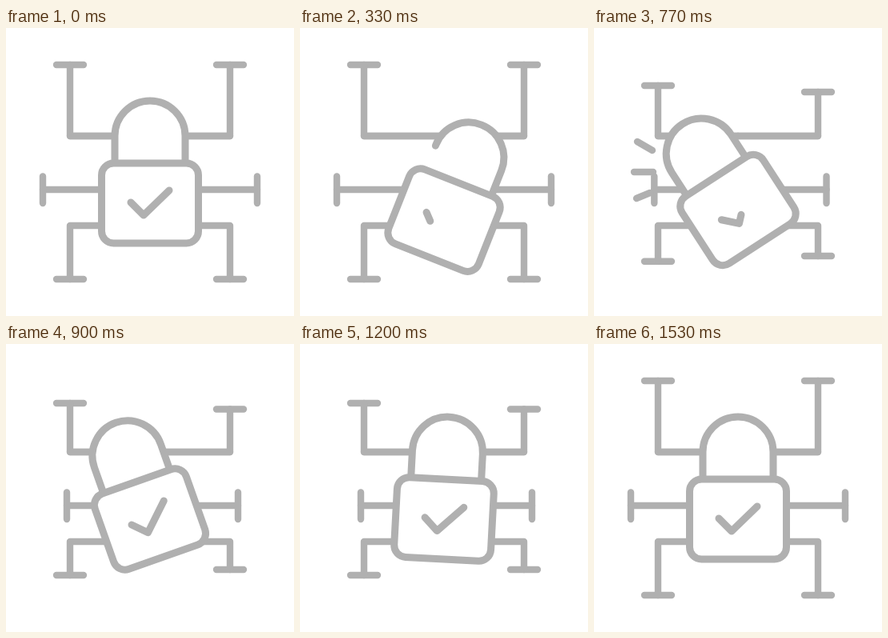
An HTML page with a canvas for the animation above (1670 ms loop, 360 by 360 pixels).

```html
<!DOCTYPE html>
<html lang="en">
<head>
<meta charset="utf-8">
<title>Lock</title>
<style>
html, body { margin: 0; height: 100%; overflow: hidden; background: #fff; }
canvas { display: block; width: 100vw; height: 100vh; }
</style>
</head>
<body>
<canvas width="360" height="360"></canvas>
<script>
const ctx = document.querySelector('canvas').getContext('2d');
const LOOP = 1670;

// Eased value from alternating time, value pairs
function key(t, ...k) {
  if (t <= k[0]) return k[1];
  for (let i = 2; i < k.length; i += 2) {
    if (t < k[i]) {
      const p = (t - k[i - 2]) / (k[i] - k[i - 2]);
      return k[i - 1] + (k[i + 1] - k[i - 1]) * (1 - Math.cos(Math.PI * p)) / 2;
    }
  }
  return k[k.length - 1];
}

const angle = t => key(t, 10, 0, 580, 36, 800, -36, 1065, 16, 1320, -7.5, 1530, 0);
const drop = t => key(t, 0, 0, 446, 25, 590, 25, 890, 0);
const opening = t => key(t, 80, 0, 420, 39, 590, 39, 740, 0);
const checked = t => key(t, 60, 1, 435, 0, 650, 0, 890, 1);

const body = new Path2D();
body.roundRect(-60.5, -50, 121, 100, 15);
const shackle = new Path2D('M44 -50V-84A44 44 0 0 0 -44 -84V-50');
const SHACKLE_LENGTH = 68 + 44 * Math.PI;
const check = new Path2D('M-24 -1L-8 15L24 -16');
const CHECK_LENGTH = 67.2;

// rest position, retracted position, retract start, extend start
const ends = {
  topLeft: [46, 74, 580, 1230], topRight: [46, 81.5, 571, 1253],
  left: [46, 76, 563, 1293], right: [314, 290, 563, 1257],
  bottomLeft: [314, 289, 590, 1290], bottomRight: [314, 282, 586, 1229]
};
const sparks = [[73, 153, 54, 142], [74, 180, 50, 180], [70, 206, 53, 213]];

function line(...p) {
  ctx.beginPath();
  for (let i = 0; i < p.length; i += 2) ctx.lineTo(p[i], p[i + 1]);
  ctx.stroke();
}

function partial(path, length) {
  if (length < 0.5) return;
  ctx.setLineDash([length, 999]);
  ctx.stroke(path);
  ctx.setLineDash([]);
}

function drawCircuit(t) {
  const at = name => {
    const [rest, tucked, pull, push] = ends[name];
    return key(t, pull, rest, pull + 230, tucked, push, tucked, push + 220, rest);
  };
  const post = (x, y, root) => {
    line(x - 17, y, x + 17, y);
    line(x, y, x, root, 180, root);
  };
  const side = x => {
    line(x, 185.5, x, 219);
    line(x, 202, 180, 202);
  };
  ctx.lineWidth = 8.4;
  post(80, at('topLeft'), 135);
  post(280, at('topRight'), 135);
  post(80, at('bottomLeft'), 247);
  post(280, at('bottomRight'), 247);
  line(80, 135, 280, 135);
  side(at('left'));
  side(at('right'));
}

function drawSparks(t) {
  const head = key(t, 690, 0, 770, 1), tail = key(t, 770, 0, 860, 1);
  if (head - tail < 0.02) return;
  for (const [x, y, x2, y2] of sparks) {
    const dx = x2 - x, dy = y2 - y;
    line(x + dx * tail, y + dy * tail, x + dx * head, y + dy * head);
  }
}

function drawLock(t) {
  ctx.save();
  ctx.translate(180, 219 + drop(t));
  ctx.rotate(angle(t) * Math.PI / 180);
  ctx.lineWidth = 9;
  ctx.fill(shackle);
  partial(shackle, SHACKLE_LENGTH - opening(t));
  ctx.fill(body);
  ctx.stroke(body);
  partial(check, CHECK_LENGTH * checked(t));
  ctx.restore();
}

function draw() {
  const t = performance.now() % LOOP;
  ctx.fillStyle = '#fff';
  ctx.fillRect(0, 0, 360, 360);
  ctx.strokeStyle = '#b0b0b0';
  ctx.lineCap = ctx.lineJoin = 'round';
  drawCircuit(t);
  drawSparks(t);
  drawLock(t);
  requestAnimationFrame(draw);
}
draw();
</script>
</body>
</html>
```
